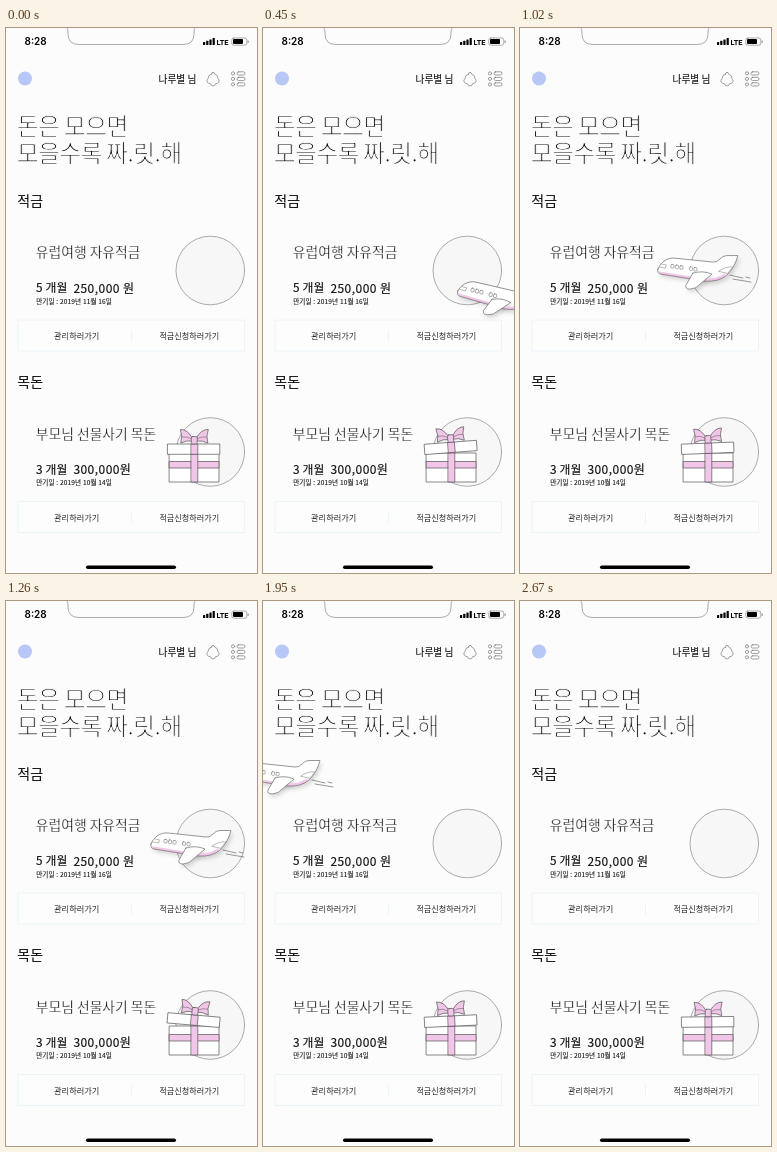
An HTML page with a canvas for the animation above (2700 ms loop, 251x545 px).

```html
<!DOCTYPE html>
<html lang="ko">
<head>
<meta charset="utf-8">
<style>
  html, body { margin: 0; width: 100%; height: 100%; overflow: hidden; background: #fcfcfc; }
  canvas { display: block; width: 251px; height: 545px; }
</style>
</head>
<body>
<canvas id="stage"></canvas>
<script>
const W = 251, H = 545, LOOP = 2700, STEP = 30, SHAKE = 540;
const PAPER = '#fcfcfc', INK = '#111', LINE = '#555', SOFT = '#777', PINK = '#f2c6e8', RULE = '#e6f1f8';
const KOREAN = '"Noto Sans CJK KR", "Noto Sans CJK", sans-serif';

const canvas = document.getElementById('stage');
const ctx = canvas.getContext('2d');
const ratio = window.devicePixelRatio || 1;
canvas.width = W * ratio;
canvas.height = H * ratio;

// Plane centre: time, x, y, tilt in degrees
const flight = [
  [0, 330, 318, 9], [300, 264, 287, 8], [450, 235, 272, 7], [570, 208, 259, 5],
  [780, 186, 248, 1], [950, 178, 245, 0], [1260, 186, 247, 0], [1680, 187.5, 248, 0],
  [1800, 146, 231, 0], [1950, 18, 177, 0], [2070, -141, 110, 0]
];

// Smooth curve through the keys
function track(keys, t, field) {
  const last = keys.length - 1;
  if (t >= keys[last][0]) return keys[last][field];
  let i = 0;
  while (t >= keys[i + 1][0]) i++;
  const slope = k => {
    const a = keys[Math.max(k - 1, 0)], b = keys[Math.min(k + 1, last)];
    return (b[field] - a[field]) / (b[0] - a[0]);
  };
  const [p, q] = [keys[i], keys[i + 1]];
  const span = q[0] - p[0], u = (t - p[0]) / span, v = 1 - u;
  return p[field] * (1 + 2 * u) * v * v + q[field] * u * u * (3 - 2 * u)
    + span * u * v * (slope(i) * v - slope(i + 1) * u);
}

const ease = u => (1 - Math.cos(Math.PI * u)) / 2;

function lidTilt(t) {
  const p = t % SHAKE;
  if (p < 245) return 6 * ease(p / 245);
  if (p < 385) return 6 - 13 * ease((p - 245) / 140);
  return -7 + 7 * ease((p - 385) / 155);
}

function paint(fill, stroke, width) {
  if (fill) { ctx.fillStyle = fill; ctx.fill(); }
  if (stroke) { ctx.strokeStyle = stroke; ctx.lineWidth = width; ctx.stroke(); }
}

function shape(d, fill, stroke, width = 0.7) {
  const path = new Path2D(d);
  if (fill) { ctx.fillStyle = fill; ctx.fill(path); }
  if (stroke) { ctx.strokeStyle = stroke; ctx.lineWidth = width; ctx.stroke(path); }
}

function box(x, y, w, h, fill, stroke, radius = 0, width = 0.7) {
  ctx.beginPath();
  ctx.roundRect(x, y, w, h, radius);
  paint(fill, stroke, width);
}

function disc(x, y, r, fill, stroke, width = 0.7) {
  ctx.beginPath();
  ctx.arc(x, y, r, 0, Math.PI * 2);
  paint(fill, stroke, width);
}

// Positive weight thickens the strokes, negative weight slims them
function text(str, x, middle, size, weight = 0, spacing = 0) {
  ctx.font = `400 ${size}px ${KOREAN}`;
  ctx.letterSpacing = spacing + 'px';
  ctx.fillStyle = INK;
  const left = x - size * 0.05, base = middle + size * 0.38;
  ctx.fillText(str, left, base);
  if (weight) {
    ctx.strokeStyle = weight > 0 ? INK : PAPER;
    ctx.lineWidth = Math.abs(weight);
    ctx.strokeText(str, left, base);
  }
  ctx.letterSpacing = '0px';
}

function statusBar() {
  shape('M61 0 Q62 .5 62 4 V6 Q62 16.5 73 16.5 H177 Q188 16.5 188 6 V4 Q188 .5 189 0', null, '#888');
  ctx.fillStyle = '#000';
  ctx.font = '600 10px Inter, sans-serif';
  ctx.fillText('8:28', 18.5, 17);
  ctx.font = '700 7.4px Roboto, sans-serif';
  ctx.fillText('LTE', 210.5, 16.6);
  for (let i = 0; i < 4; i++) box(197 + i * 3.2, 14 - i * 1.3, 2.2, 3 + i * 1.3, '#000', null, 0.5);
  box(225.8, 10, 15, 7.2, null, '#777', 2, 0.6);
  box(227, 11.1, 10, 5, '#000', null, 1);
  box(241.6, 12.4, 1, 2.4, '#777', null, 0.5);
}

function header() {
  disc(19, 50.5, 7, '#b7c8f6');
  text('나루별 님', 153, 51, 9.7, 0.1);
  shape('M205.5 46 Q205.5 44.3 207 44.3 Q208.5 44.3 208.5 46 Q212 47 212 50.5 Q213.8 52 212.8 54 Q212 55.7 209.5 55.7 '
    + 'Q209 58 207 58 Q205 58 204.5 55.7 Q202 55.7 201.2 54 Q200.2 52 202 50.5 Q202 47 205.5 46 Z', null, SOFT);
  for (const y of [43.8, 49.3, 54.8]) {
    disc(227, y + 1.6, 1.6, null, SOFT);
    box(231, y, 8, 3.2, null, SOFT, 1.6);
  }
}

function product(y, title, name, months, amount, due) {
  text(title, 12, y, 14, 0.1);
  text(name, 30.5, y + 51.3, 13.8, -0.3);
  text(months, 30.5, y + 87.5, 11.8, 0.15, 0.2);
  text(amount, 68, y + 87.5, 12, 0.15, 0.45);
  text('만기일 : ' + due, 30.5, y + 100.5, 6.6, 0.1, 0.13);
  box(12.5, y + 119.5, 226, 31, '#fdfdfd', RULE, 0, 0.8);
  shape(`M125.5 ${y + 130} v11`, null, RULE, 0.8);
  text('관리하러가기', 48.5, y + 135.5, 8.2, -0.1);
  text('적금신청하러가기', 153.8, y + 135.5, 8.15, -0.1);
  disc(204.3, y + 70, 34.3, '#f7f7f7', '#888');
}

function bowSide() {
  shape('M-2 -11 Q-7 -20 -14 -19.5 Q-11.5 -13 -13.5 -6 Q-8 -9 -2 -8 Z', PINK, LINE);
  shape('M-2.5 -10 Q-7 -13 -12.3 -12', null, LINE, 0.5);
}

function gift(t) {
  const tilt = lidTilt(t);
  box(163.5, 425, 49.5, 29, '#fff', LINE);
  box(163.5, 433.5, 49.5, 6.5, PINK, LINE);
  box(185.3, 425, 6.5, 29, PINK, LINE);
  ctx.save();
  ctx.translate(188.3, 421 - Math.abs(tilt) * 0.4);
  ctx.rotate(tilt * Math.PI / 180);
  box(-26.5, -5, 52, 10.3, '#fff', LINE);
  box(-3, -5, 6.5, 10.3, PINK, LINE);
  bowSide();
  ctx.save();
  ctx.scale(-1, 1);
  bowSide();
  ctx.restore();
  box(-3, -12.5, 6, 7.5, PINK, LINE, 1.5);
  ctx.restore();
}

function plane(t) {
  const [x, y, tilt] = [1, 2, 3].map(field => track(flight, t, field));
  const body = 'M-41 -4 C-39 -10 -32 -16 -24 -15 L14 -11 Q18 -10.5 21 -14 Q24 -17.5 28 -17.5 L39 -17.5 '
    + 'Q36 -6 28 2 Q20 9 6 8 L-38 1 Q-42 0 -41 -4 Z';
  const wing = 'M-6 0 L-13 12 Q-14 16 -9 16 L-3 14.5 L13 1 Q4 -3 -6 0 Z';
  ctx.save();
  ctx.translate(x, y);
  ctx.rotate(tilt * Math.PI / 180);
  shape('M31 2 L44 5 M34 6 L52 9 M47 4 L51 5', null, LINE, 0.6);
  ctx.save();
  ctx.shadowColor = 'rgba(0,0,0,.15)';
  ctx.shadowBlur = 4 * ratio;
  ctx.shadowOffsetX = 2 * ratio;
  ctx.shadowOffsetY = 3 * ratio;
  shape(body, '#fff');
  shape(wing, '#fff');
  ctx.restore();
  shape('M-41 -2 L5 5.5 Q18 6 27 0 L26 3.5 Q18 9 6 8 L-38 1 Z', PINK);
  shape(body, null, LINE, 0.6);
  shape('M-37 -9 L-32.5 -8.2 L-33.5 -5 L-39.5 -6', null, SOFT, 0.5);
  for (const left of [-28, -23.5, -19, -9.5, -5]) {
    box(left, -5 + left * 0.13, 3.1, 3.6, '#fff', SOFT, 1, 0.6);
  }
  shape(wing, '#fff', LINE, 0.6);
  shape('M20 -2 Q27 -7 34 -6 L29 0 Z', '#fff', SOFT, 0.5);
  ctx.restore();
}

function draw(now) {
  const t = Math.floor((now % LOOP) / STEP) * STEP;
  ctx.setTransform(ratio, 0, 0, ratio, 0, 0);
  ctx.lineJoin = ctx.lineCap = 'round';
  ctx.fillStyle = PAPER;
  ctx.fillRect(0, 0, W, H);
  statusBar();
  header();
  text('돈은 모으면', 12, 97.8, 24, -1.05, -0.85);
  text('모을수록 짜.릿.해', 12, 125, 24, -1.05, -0.88);
  product(172.5, '적금', '유럽여행 자유적금', '5 개월', '250,000 원', '2019년 11월 16일');
  product(354, '목돈', '부모님 선물사기 목돈', '3 개월', '300,000원', '2019년 10월 14일');
  gift(t);
  plane(t);
  box(80, 537.5, 90, 3.5, '#000', null, 1.75);
}

let start;
function frame(now) {
  start ??= now;
  draw(now - start);
  requestAnimationFrame(frame);
}
draw(0);
requestAnimationFrame(frame);
</script>
</body>
</html>
```
